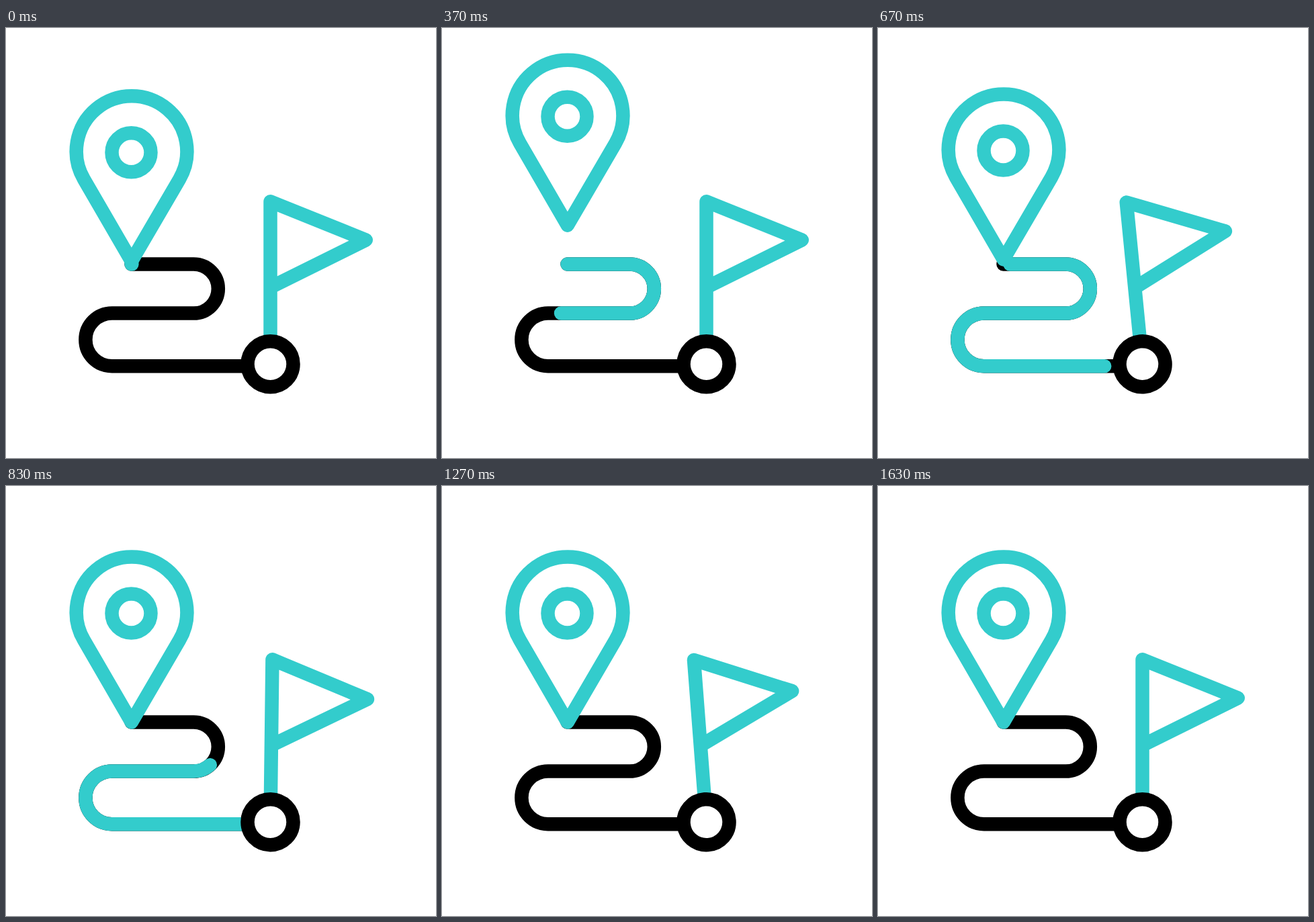
Write an HTML page that moves like this. It is 640 px wide and 640 px high and loops after 1670 ms.

```html
<!DOCTYPE html>
<html lang="en">
<head>
<meta charset="utf-8">
<title>Route</title>
<style>
  html, body { margin: 0; height: 100%; overflow: hidden; background: #fff; }
  svg { display: block; width: 100%; height: 100%; }
  g, path, circle { fill: none; stroke-width: 20.5; stroke-linecap: round; stroke-linejoin: round; }
  .teal { stroke: #33cccc; }
  .black { stroke: #000; }
  #hub { fill: #fff; }
</style>
</head>
<body>
<svg viewBox="0 0 640 640">
  <defs>
    <path id="road" d="M186.5 351.5H279.3A36.5 36.5 0 0 1 279.3 424.6H157.7A39.3 39.3 0 0 0 157.7 503.2H359.5"/>
  </defs>
  <use href="#road" class="black"/>
  <use href="#road" class="teal" id="trail"/>
  <g id="pin" class="teal">
    <path d="M186.8 351.5L116 229.4A82.3 82.3 0 1 1 258.1 229.4Z"/>
    <circle cx="186.5" cy="189.6" r="29"/>
  </g>
  <g id="flag">
    <path class="teal" d="M393.5 466V258.3L535.7 315.5L393.5 386"/>
    <circle id="hub" class="black" cx="393.5" cy="500.2" r="34"/>
  </g>
</svg>
<script>
  const LOOP = 1670;
  const byId = id => document.getElementById(id);
  const pin = byId('pin'), flag = byId('flag'), trail = byId('trail');
  const roadLength = byId('road').getTotalLength();

  // Each track is a list of [frame, value] at 30 frames per second.
  const pinY = [[-1.9, 0], [7.8, -62.2], [24, 0]];
  const trailEnd = [[-0.7, 0], [23.4, 1]];
  const trailStart = [[18.3, 0], [36.3, 1]];
  const flagAngle = [[15.05, 0], [21.95, -6.65], [28.85, 12], [35.75, -6.6], [42.65, 4], [48.9, 0]];

  // Symmetric ease, equal to cubic-bezier(.46, 0, .54, 1).
  function ease(x) {
    let lo = 0, hi = 1;
    for (let i = 0; i < 30; i++) {
      const u = (lo + hi) / 2, v = 1 - u;
      if (1.38 * u * v * v + 1.62 * u * u * v + u * u * u < x) lo = u; else hi = u;
    }
    return lo * lo * (3 - 2 * lo);
  }

  function valueAt(track, frame) {
    if (frame <= track[0][0]) return track[0][1];
    for (let i = 1; i < track.length; i++) {
      const [t0, a] = track[i - 1], [t1, b] = track[i];
      if (frame < t1) return a + (b - a) * ease((frame - t0) / (t1 - t0));
    }
    return track[track.length - 1][1];
  }

  function draw(ms) {
    // Frames begin at multiples of 1/30 s rounded to 10 ms.
    const frame = Math.floor((Math.floor(ms / 10) * 3 + 1) / 10);
    const start = valueAt(trailStart, frame) * roadLength;
    const end = valueAt(trailEnd, frame) * roadLength;

    pin.setAttribute('transform', `translate(0 ${valueAt(pinY, frame)})`);
    flag.setAttribute('transform', `rotate(${valueAt(flagAngle, frame)} 393.5 500.2)`);
    trail.style.visibility = end - start > 0.01 ? 'visible' : 'hidden';
    trail.style.strokeDasharray = `${end - start} 9999`;
    trail.style.strokeDashoffset = -start;
  }

  const began = performance.now();
  function tick() {
    draw((performance.now() - began) % LOOP);
    requestAnimationFrame(tick);
  }
  tick();
</script>
</body>
</html>
```
